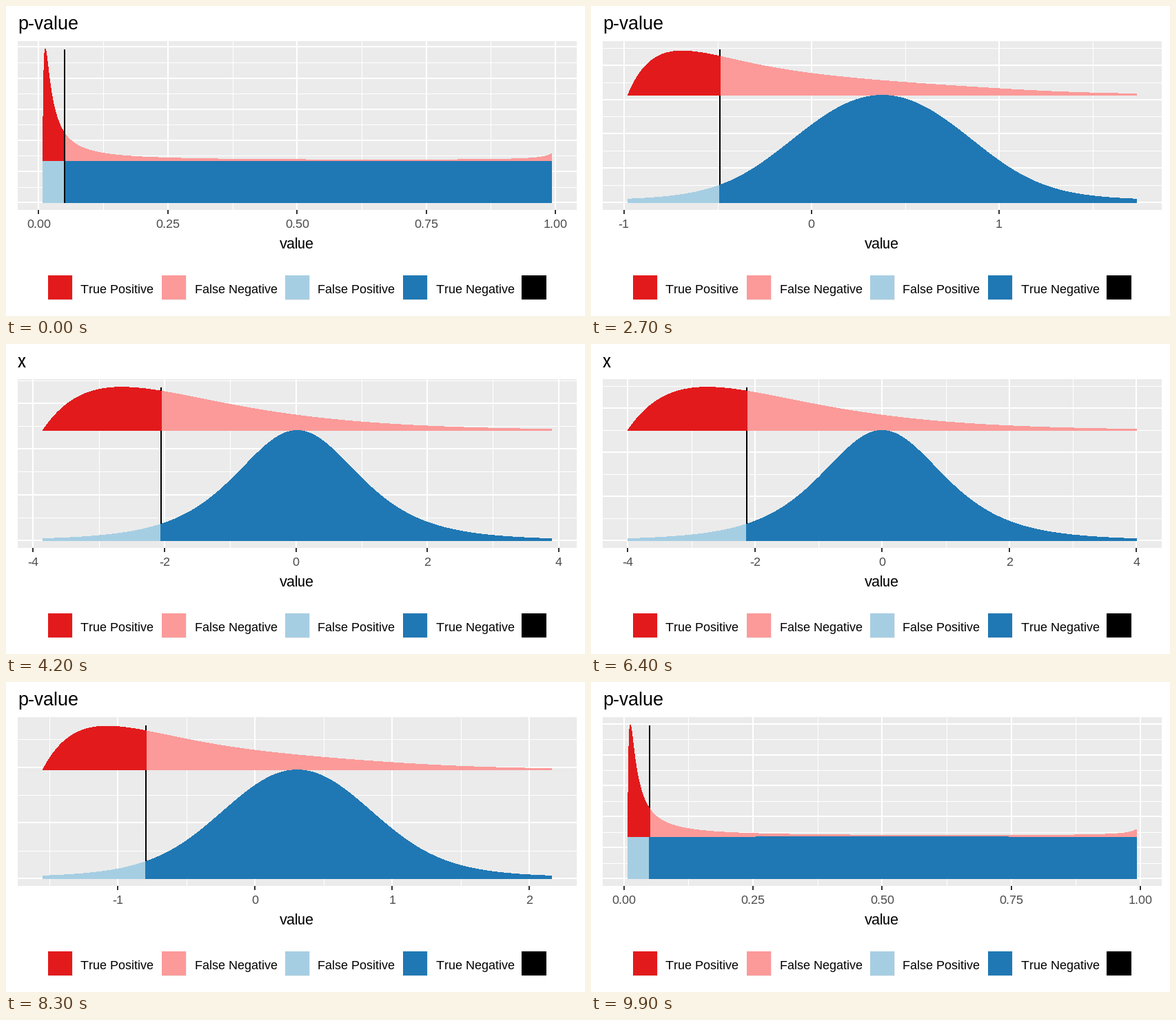
Recreate the animation shown at these times as a matplotlib script. Size 840x450 px, loop 10000 ms.

```python
import math

import matplotlib.pyplot as plt
import numpy as np
from matplotlib.animation import FuncAnimation
from matplotlib.patches import Polygon, Rectangle

W, H, DPI = 840, 450, 100
FRAMES, INTERVAL = 100, 100
PX = 72 / DPI  # points per pixel

# Panel, and the pixel span that the data fills inside it
LEFT, RIGHT, TOP, BOTTOM = 17, 828, 51, 296
X0, X1 = 53.5, 791.1
Y0, Y1 = 285.5, 62.7

RED, PINK, SKY, BLUE = "#E31A1C", "#FB9A99", "#A6CEE3", "#1F78B4"
GREY = "#EBEBEB"

# Forward and backward morphs between the two states (start, end)
OUT, BACK = (12, 50), (63, 100)
TITLE_X = range(31, 82)

plt.rcParams.update({
    "font.family": "Liberation Sans",
    "text.hinting": "native",
    "text.hinting_factor": 1,
})


def t4_pdf(x):
    return 0.375 * (1 + x**2 / 4) ** -2.5


def t4_cdf(x):
    r = 1 + x**2 / 4
    return 0.5 + 0.375 * x / np.sqrt(r) * (1 - x**2 / r / 12)


def gamma_pdf(u, rate=0.8):
    return rate**2 * u * np.exp(-rate * u)


CUT = -2.1318
xs = np.sort(np.append(np.linspace(-4, 4, 1601), CUT))
split = int(np.searchsorted(xs, CUT))
neg, pos = t4_pdf(xs), gamma_pdf(xs + 4)

# Each state: positions, lower heights, upper heights
P_STATE = (t4_cdf(xs), np.full_like(xs, 4 / 3), 0.189 * pos / neg)
X_STATE = (xs, neg * 2000 / 3, pos * 1000 / 3)


def cubic_in_out(t):
    return 4 * t**3 if t < 0.5 else 1 - 4 * (1 - t) ** 3


def morph(i):
    """Share of the x state at step i."""
    if i <= OUT[0]:
        return 0.0
    if i < OUT[1]:
        return cubic_in_out((i - OUT[0]) / (OUT[1] - OUT[0]))
    if i <= BACK[0]:
        return 1.0
    return 1 - cubic_in_out((i - BACK[0]) / (BACK[1] - BACK[0]))


def nice_breaks(lo, hi, m=5):
    """Extended Wilkinson axis breaks."""
    nice = [1, 5, 2, 2.5, 4, 3]
    span = hi - lo
    best, result = -math.inf, None
    for rank, q in enumerate(nice):
        for k in range(2, 11):
            z0 = math.ceil(math.log10(span / (k + 1) / q))
            for z in (z0 - 1, z0, z0 + 1):
                step = q * 10.0**z
                first = math.floor(hi / step) - (k - 1)
                last = math.ceil(lo / step)
                for n in range(min(first, last) - 1, max(first, last) + 2):
                    a, b = n * step, (n + k - 1) * step
                    simple = (a <= 0 <= b) - rank / (len(nice) - 1)
                    cover = 1 - 0.5 * ((hi - b) ** 2 + (lo - a) ** 2) / (0.1 * span) ** 2
                    r = (k - 1) / (b - a)
                    rt = (m - 1) / (max(b, hi) - min(a, lo))
                    dense = 2 - max(r / rt, rt / r)
                    score = 0.25 * simple + 0.2 * cover + 0.5 * dense + 0.05
                    if score > best + 1e-9:
                        best, result = score, (n, k, step)
    n, k, step = result
    return np.arange(n, n + k) * step, step


def labels_for(breaks):
    digits = next(d for d in range(6) if np.allclose(breaks, np.round(breaks, d), atol=1e-8))
    return [f"{b + 0.0:.{digits}f}" for b in breaks]


fig = plt.figure(figsize=(W / DPI, H / DPI), dpi=DPI, facecolor="white")
ax = fig.add_axes([0, 0, 1, 1])
ax.set_xlim(0, W)
ax.set_ylim(H, 0)
ax.axis("off")


def text(x, y, s, size, color="black", ha="left"):
    return ax.text(x, y, s, fontsize=size * PX, color=color, ha=ha, va="baseline")


def line(xa, ya, xb, yb, color, width, z):
    return ax.plot([xa, xb], [ya, yb], color=color, lw=width * PX,
                   solid_capstyle="butt", zorder=z)[0]


def box(x, y, w, h, color):
    ax.add_patch(Rectangle((x, y), w, h, fc=color, lw=0, zorder=0))


def area(x, top, base, color, z):
    # Slight overlap at the sides, so that neighbours meet over the threshold
    x = np.concatenate([[x[0] - 0.4], x, [x[-1] + 0.4]])
    top = np.concatenate([top[:1], top, top[-1:]])
    xy = np.column_stack([x, top])
    xy = np.vstack([xy, [x[-1], base], [x[0], base]])
    return ax.add_patch(Polygon(xy, fc=color, lw=0, antialiased=False, zorder=z))


box(LEFT, TOP, RIGHT - LEFT, BOTTOM - TOP, GREY)
text(421.5, 352, "value", 22, ha="center")
legend = [(61, RED, "True Positive"), (226, PINK, "False Negative"),
          (405, SKY, "False Positive"), (576, BLUE, "True Negative"), (748.45, "black", "")]
for kx, color, name in legend:
    box(kx, 391, 36, 36, GREY)
    box(kx, 391, 35.1, 35.1, color)
    text(kx + 47.5, 417, name, 18)
title = text(17, 33.5, "", 27)

moving = []


def draw(i):
    while moving:
        moving.pop().remove()

    s = morph(i)
    x, low, high = ((1 - s) * a + s * b for a, b in zip(P_STATE, X_STATE))
    base = (1 - s) * P_STATE[1].max() + s * X_STATE[1].max()
    total = base + (1 - s) * P_STATE[2].max() + s * X_STATE[2].max()
    lo, hi = x[0], x[-1]

    def px(v):
        return X0 + (v - lo) / (hi - lo) * (X1 - X0)

    def py(v):
        return Y0 + v / total * (Y1 - Y0)

    xb, xstep = nice_breaks(lo, hi)
    yb, ystep = nice_breaks(0, total)

    def grid(xv, yv, width, z):
        for v in px(xv):
            if LEFT < v < RIGHT:
                moving.append(line(v, TOP, v, BOTTOM, "white", width, z))
        for v in py(yv) - 0.4:
            if TOP < v < BOTTOM:
                moving.append(line(LEFT, v, RIGHT, v, "white", width, z))

    grid(np.append(xb[0] - xstep, xb) + xstep / 2, np.append(yb[0] - ystep, yb) + ystep / 2, 1, 1)
    grid(xb, yb, 2, 2)

    for v, s_label in zip(px(xb), labels_for(xb)):
        if LEFT < v < RIGHT:
            moving.append(line(v, BOTTOM, v, BOTTOM + 5.5, "#333333", 2, 2))
            moving.append(text(v, 322, s_label, 18, "#4D4D4D", "center"))

    X, lower, upper = px(x), py(low), py(base + high)
    left, right = slice(0, split + 1), slice(split, None)
    moving.append(area(X[right], upper[right], py(base), PINK, 4))
    moving.append(area(X[left], upper[left], py(base), RED, 5))
    moving.append(area(X[left], lower[left], py(0), SKY, 6))
    moving.append(area(X[right], lower[right], py(0), BLUE, 7))

    # The threshold lies on top only while a state rests
    resting = i <= OUT[0] or OUT[1] <= i <= BACK[0]
    moving.append(line(X[split], Y1, X[split], Y0, "black", 2, 8 if resting else 3))

    title.set_text("x" if i in TITLE_X else "p-value")
    return moving + [title]


anim = FuncAnimation(fig, draw, frames=FRAMES, interval=INTERVAL, repeat=True,
                     repeat_delay=0, init_func=lambda: draw(0), blit=False)
plt.show()
```
